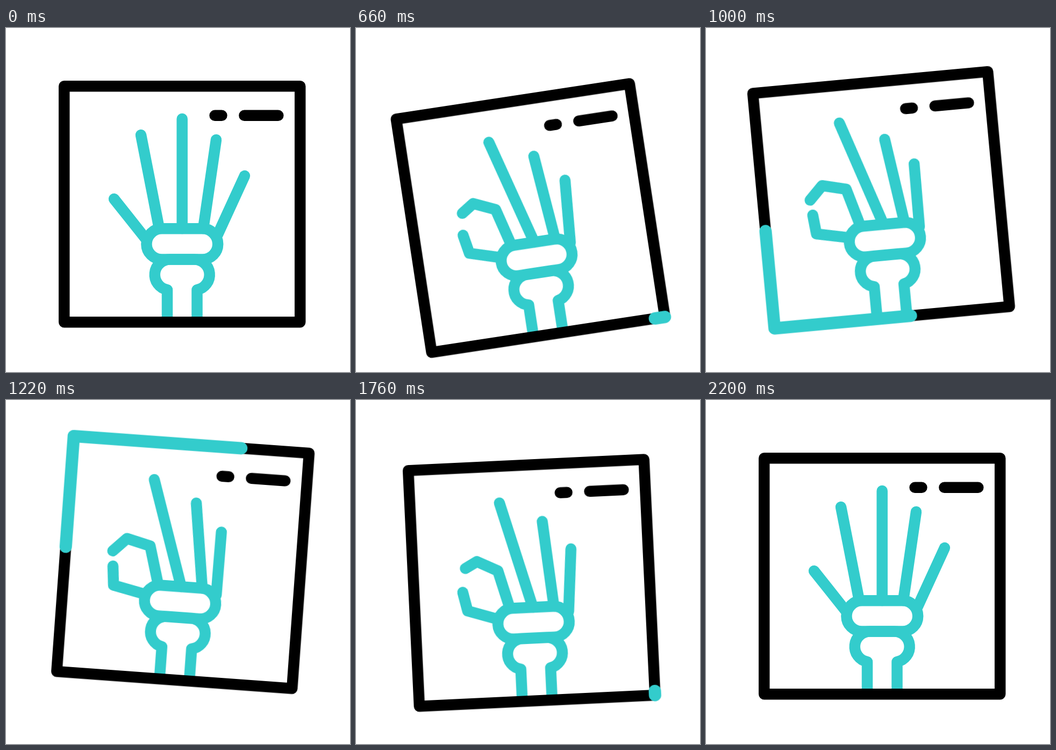
Recreate the animation shown at these times as an HTML page without scripts. Size 640x640 px, loop 2.4 s.

```html
<!DOCTYPE html>
<html lang="en">
<head>
<meta charset="utf-8">
<title>Hand X-ray</title>
<style>
  @property --head { syntax: "<length>"; inherits: false; initial-value: 0px; }
  @property --tail { syntax: "<length>"; inherits: false; initial-value: 0px; }

  html, body { margin: 0; width: 100%; height: 100%; overflow: hidden; background: #fff; }
  svg { display: block; width: 100%; height: 100%; }

  .bob, .tilt, .fingers, .trail {
    animation: 2400ms cubic-bezier(.3333, 0, .6667, 1) infinite;
  }
  .bob { animation-name: bob; }
  .tilt { animation-name: tilt; transform-origin: 327.7px 347.5px; }
  .line { fill: none; stroke: #000; stroke-width: 20.5; stroke-linecap: round; stroke-linejoin: round; }
  .bone { stroke: #33cccc; }
  .arm { stroke-linecap: butt; }
  .fingers { animation-name: curl; }
  .trail {
    stroke: #33cccc;
    stroke-width: 23;
    stroke-dasharray: calc(var(--head) - var(--tail)) 2000px;
    stroke-dashoffset: calc(-1 * var(--tail));
    animation-name: head, tail, show;
    animation-timing-function: cubic-bezier(.3333, 0, .6667, 1), cubic-bezier(.3333, 0, .6667, 1), step-end;
  }

  @keyframes bob {
    0%, 8.3333% { transform: translateY(0); }
    29.1667% { transform: translateY(26px); }
    50% { transform: translateY(-26px); }
    70.8333% { transform: translateY(13px); }
    91.6667%, 100% { transform: translateY(0); }
  }
  @keyframes tilt {
    0%, 8.3333% { transform: rotate(0deg); }
    33.3333% { transform: rotate(-10deg); }
    58.3333% { transform: rotate(8deg); }
    75% { transform: rotate(-3deg); }
    91.6667%, 100% { transform: rotate(0deg); }
  }
  /* thumb, index, middle, ring, little finger */
  @keyframes curl {
    0%, 8.3333%, 91.6667%, 100% {
      d: path("M201 318L226.6 350.2L259 391M251 199L260.6 248L272 306L285 373M327.7 169L327.7 373M391 208L367 373M444 275L394 384");
    }
    33.3333%, 66.6667% {
      d: path("M198.4 344L202 379.5L259 391.5M196 316L220.8 291L264.7 301.7L285 373M263.4 178L327.7 373M344.6 216L367 373M395 266.5L394 384");
    }
  }
  @keyframes head {
    0%, 25% { --head: 0px; }
    66.6667%, 100% { --head: 1756px; }
  }
  @keyframes tail {
    0%, 33.3333% { --tail: 0px; }
    75%, 100% { --tail: 1756px; }
  }
  @keyframes show {
    0% { visibility: hidden; }
    25.1% { visibility: visible; }
    75%, 100% { visibility: hidden; }
  }
</style>
</head>
<body>
<svg viewBox="0 0 640 640">
  <g class="bob">
    <g class="tilt">
      <path class="line bone fingers" d="M201 318L226.6 350.2L259 391M251 199L260.6 248L272 306L285 373M327.7 169L327.7 373M391 208L367 373M444 275L394 384"/>
      <rect class="line bone" x="261.4" y="373.3" width="132.8" height="57.2" rx="28.6"/>
      <path class="line bone arm" d="M300 547V487A28.5 28.5 0 0 1 306 430.5H349.5A28.5 28.5 0 0 1 355.5 487V547"/>
      <rect class="line" x="108.2" y="108.2" width="439" height="439"/>
      <path class="line" d="M388.6 162.7H401.4M443.4 162.7H506.3"/>
      <path class="line trail" d="M547.2 547.2H108.2V108.2H547.2V547.2"/>
    </g>
  </g>
</svg>
</body>
</html>
```
